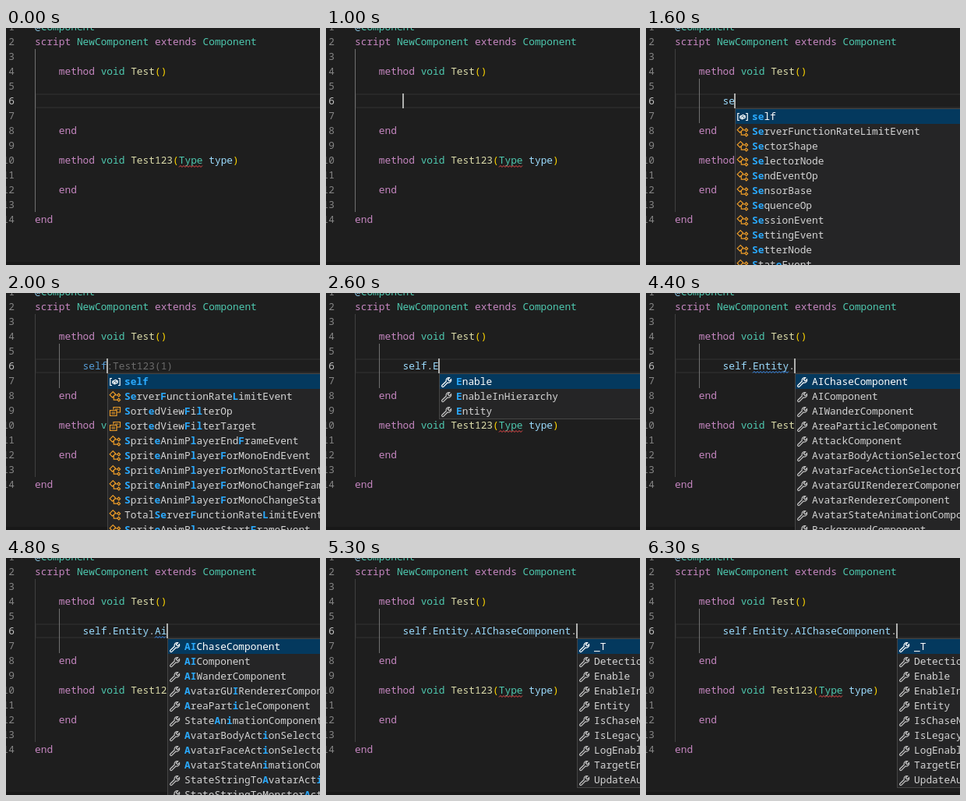
Animation of 403x304 px, one loop 6.5 s. Source, as an HTML page:

```html
<!DOCTYPE html>
<html lang="en">
<head>
<meta charset="utf-8">
<title>Code completion</title>
<style>
  html, body { margin: 0; width: 100%; height: 100%; overflow: hidden; background: #1e1e1e; }
  svg { display: block; width: 403px; height: 304px; }
  text { font: 12.83px "Noto Sans Mono", "DejaVu Sans Mono", monospace; white-space: pre; }
  .hit { font-weight: bold; }
</style>
</head>
<body>
<svg id="stage" viewBox="0 0 403 304"></svg>
<script>
(() => {
const LOOP = 6500, CHAR = 7.698, ROW = 19, LEFT = 37, ACTIVE = 6;
const COLOR = { k: '#c586c0', t: '#4ec9b0', f: '#dcdcaa', v: '#9cdcfe', b: '#569cd6', p: '#ffd700', w: '#d4d4d4', g: '#6b6b6b' };

// Each token is a colour key followed by its text.
const CODE = {
  1: ['v@', 'tComponent'],
  2: ['kscript ', 'tNewComponent ', 'kextends ', 'tComponent'],
  4: ['k    method ', 'tvoid ', 'fTest', 'p()'],
  8: ['k    end'],
  10: ['k    method ', 'tvoid ', 'fTest123', 'p(', 'tType ', 'vtype', 'p)'],
  12: ['k    end'],
  14: ['kend']
};

const ICONS = {
  prop: ['#c5c5c5', 'M13.6 4.6L11.2 6.9 9.3 5 11.6 2.6A3.7 3.7 0 0 0 7.2 7.2L2 12.3a1.3 1.3 0 0 0 1.9 1.9L9 9A3.7 3.7 0 0 0 13.6 4.6z'],
  cls: ['#ee9d28', 'M5.3 1.6L8.7 5 4.6 9.1 1.2 5.7zM7.5 6H11M6.3 7.7V12.2H11M12.6 4l2 2-1.8 1.8-2-2zM12.6 10.2l2 2-1.8 1.8-2-2z'],
  enm: ['#ee9d28', 'M6 5.5V2.5H14.5V9H10.5M8 5H12.5M1.5 6.5H10V13.5H1.5zM3.5 9H8M3.5 11H8'],
  vrb: ['#c5c5c5', 'M4 3.5H1.8V12.5H4M12 3.5H14.2V12.5H12M4.8 7.2L8.6 5.5 11.2 6.8V9L7.4 10.8 4.8 9.5zM4.8 7.2L7.4 8.5 11.2 6.8M7.4 8.5V10.8']
};

const list = (kind, names) => names.split(' ').map(name => ({ kind, name }));
const selfItem = list('vrb', 'self');
const words = [...selfItem, ...list('cls', 'ServerFunctionRateLimitEvent SectorShape SelectorNode SendEventOp SensorBase SequenceOp SessionEvent SettingEvent SetterNode StateEvent')];
const fuzzy = [
  ...selfItem,
  ...list('cls', 'ServerFunctionRateLimitEvent'),
  ...list('enm', 'SortedViewFilterOp SortedViewFilterTarget'),
  ...list('cls', 'SpriteAnimPlayerEndFrameEvent SpriteAnimPlayerForMonoEndEvent SpriteAnimPlayerForMonoStartEvent SpriteAnimPlayerForMonoChangeFrameEvent SpriteAnimPlayerForMonoChangeStateEvent TotalServerFunctionRateLimitEvent SpriteAnimPlayerStartFrameEvent')
];
const members = list('prop', '_T Enable EnableInHierarchy Entity');
const named = list('prop', 'Enable EnableInHierarchy Entity');
const entity = list('prop', 'Entity');
const parts = list('prop', 'AIChaseComponent AIComponent AIWanderComponent AreaParticleComponent AttackComponent AvatarBodyActionSelectorComponent AvatarFaceActionSelectorComponent AvatarGUIRendererComponent AvatarRendererComponent AvatarStateAnimationComponent BackgroundComponent');
const found = list('prop', 'AIChaseComponent AIComponent AIWanderComponent AvatarGUIRendererComponent AreaParticleComponent StateAnimationComponent AvatarBodyActionSelectorComponent AvatarFaceActionSelectorComponent AvatarStateAnimationComponent StateStringToAvatarActionComponent StateStringToMonsterActionComponent');
const chase = list('prop', '_T DetectionRange Enable EnableInHierarchy Entity IsChaseNearPlayer IsLegacy LogEnabled TargetEntityRef UpdateAuthority');

// start, typed text, search text, suggestions, [underline start, length]
const STEPS = [
  [0, ''],
  [1400, 's', 's', words],
  [1600, 'se', 'se', words],
  [1900, 'sel', 'sel', fuzzy],
  [2000, 'self', 'self', fuzzy],
  [2300, 'self.'],
  [2400, 'self.', '', members],
  [2600, 'self.E', 'e', named],
  [2700, 'self.En', 'en', named],
  [2800, 'self.Ent', 'ent', entity],
  [2900, 'self.Enti', 'enti', entity],
  [3100, 'self.Entity'],
  [3200, 'self.Entity', '', null, [5, 6]],
  [3400, 'self.Entity.', '', null, [5, 6]],
  [3500, 'self.Entity.', '', parts, [5, 6]],
  [4700, 'self.Entity.A', 'a', parts, [12, 1]],
  [4800, 'self.Entity.Ai', 'ai', found, [12, 2]],
  [5300, 'self.Entity.AIChaseComponent.', '', chase]
];
const HIDDEN = [[0, 300], [800, 1000], [3900, 4400], [5800, 6300]];

const rowTop = n => 84 + (n - ACTIVE) * ROW;
const col = n => LEFT + n * CHAR;
const rect = (x, y, w, h, fill) => `<rect x="${x}" y="${y}" width="${w}" height="${h}" fill="${fill}"/>`;
const span = (s, fill, cls = '') => `<tspan fill="${fill}" class="${cls}">${s}</tspan>`;
const text = (x, y, body, extra = '') => `<text x="${x}" y="${y}" ${extra}>${body}</text>`;
const tokens = line => line.map(s => span(s.slice(1), COLOR[s[0]])).join('');

function squiggle(c, n, row, color) {
  const x0 = Math.round(col(c)), y = rowTop(row) + 17.5, w = Math.round(n * CHAR);
  let d = `M${x0} ${y + 1}`;
  for (let x = 2, up = true; x <= w; x += 2, up = !up) d += `L${x0 + x} ${up ? y - 1 : y + 1}`;
  return `<path d="${d}" fill="none" stroke="${color}"/>`;
}

function hits(name, query) {
  const low = name.toLowerCase(), out = [];
  let from = name.indexOf(query[0].toUpperCase());
  if (from < 0) from = low.indexOf(query[0]);
  for (const ch of query) {
    const i = low.indexOf(ch, from);
    if (from < 0 || i < 0) return null;
    out.push(i);
    from = i + 1;
  }
  return out;
}

function label(name, query, chosen) {
  // The last two letters may match in either order.
  const swapped = query.replace(/(.)(.)$/, '$2$1');
  const marks = query ? hits(name, query) || hits(name, swapped) || [] : [];
  const plain = chosen ? '#ffffff' : '#d4d4d4';
  return [...name].map((ch, i) =>
    marks.includes(i) ? span(ch, '#2aaaff', 'hit') : span(ch, plain)).join('');
}

function popup(x, query, items) {
  const y = rowTop(ACTIVE + 1) + 1, h = items.length * ROW;
  let out = rect(x + 1, y - 1, 430, h + 2, '#454545') + rect(x + 2, y, 428, h, '#252526')
    + rect(x + 2, y, 428, ROW, '#04395e');
  items.forEach(({ kind, name }, i) => {
    const [color, d] = ICONS[kind], ry = y + i * ROW;
    const stroke = i === 0 ? '#ffffff' : color;
    out += `<path transform="translate(${x + 3} ${ry + 2})" d="${d}" fill="none" stroke="${stroke}" stroke-width="1.2"/>`;
    out += text(x + 23, ry + 14, label(name, query, i === 0));
  });
  return out;
}

function typedTokens(s) {
  if (s === 'self') return ['bself', 'g:Test123(1)'];
  return s.split(/(\.)/).filter(Boolean).map(p => (p === '.' ? 'w' : 'v') + p);
}

function page() {
  let out = '';
  for (let n = 1; n <= 14; n++) {
    out += text(11, rowTop(n) + 14, n, `text-anchor="end" fill="${n === ACTIVE ? '#c6c6c6' : '#858585'}"`);
    if (CODE[n]) out += text(LEFT, rowTop(n) + 14, tokens(CODE[n]));
  }
  return out + squiggle(24, 4, 10, '#f14c4c');
}
const base = page();

function scene(t) {
  const [, typed, query, items, wave] = STEPS.filter(s => s[0] <= t).pop();
  const caret = Math.floor(col(8 + typed.length));
  let out = rect(0, 0, 403, 304, '#1e1e1e');
  out += `<rect x="38" y="85" width="380" height="17" fill="none" stroke="#282828" stroke-width="2"/>`;
  out += rect(LEFT, rowTop(3), 1, 11 * ROW, typed ? '#404040' : '#707070');
  if (typed) out += rect(68, rowTop(5), 1, 3 * ROW, '#707070');
  out += base + rect(0, 300, 403, 4, '#181818');
  out += text(col(8), rowTop(ACTIVE) + 14, tokens(typedTokens(typed)));
  if (wave) out += squiggle(8 + wave[0], wave[1], ACTIVE, '#3794ff');
  if (!HIDDEN.some(([a, b]) => t >= a && t < b)) out += rect(caret, 84, 2, ROW, '#aeafad');
  if (items) out += popup(caret, query, items);
  return out;
}

const stage = document.getElementById('stage');
const start = performance.now();
let last = '';
function draw(now) {
  const next = scene(Math.max(0, now - start) % LOOP);
  if (next !== last) stage.innerHTML = last = next;
  requestAnimationFrame(draw);
}
draw(start);
})();
</script>
</body>
</html>
```
